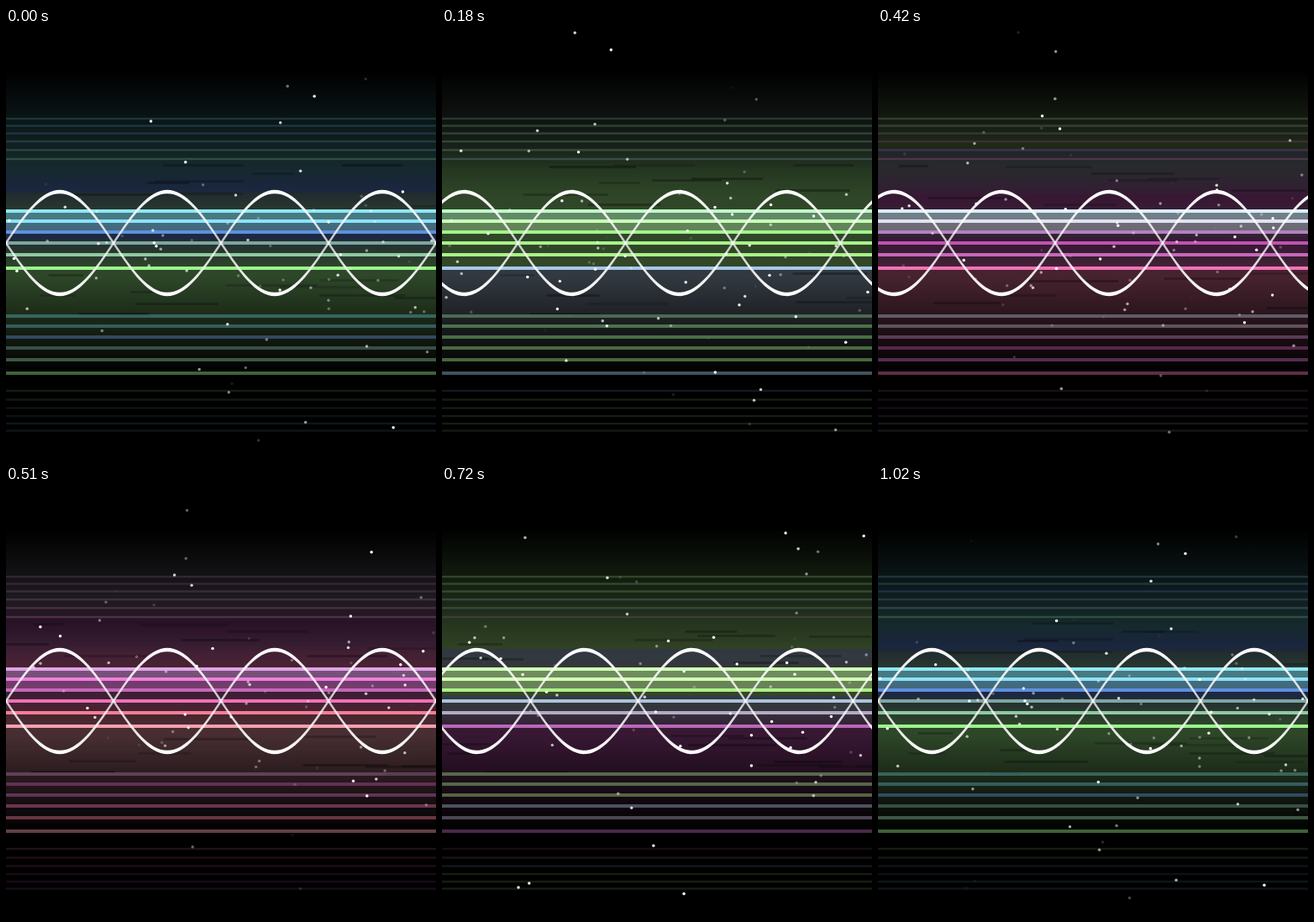
An HTML page that plays this animation: 512x512 px, repeating every 1050 ms.

```html
<!DOCTYPE html>
<html lang="en">
<head>
<meta charset="utf-8">
<title>Standing waves</title>
<style>
html, body { margin: 0; width: 100%; height: 100%; overflow: hidden; background: #000; }
svg { display: block; width: 100%; height: 100%; }
</style>
</head>
<body>
<svg viewBox="0 0 512 512">
  <defs>
    <linearGradient id="shine" gradientUnits="userSpaceOnUse" x1="0" y1="193" x2="0" y2="319">
      <stop offset="0" stop-color="#fff"/>
      <stop offset=".5" stop-color="#fff" stop-opacity=".72"/>
      <stop offset="1" stop-color="#fff"/>
    </linearGradient>
  </defs>
  <rect width="512" height="512"/>
  <g id="sky" shape-rendering="crispEdges"></g>
  <g id="streaks"></g>
  <g id="lines"></g>
  <g id="waves" fill="url(#shine)"></g>
  <g id="stars" fill="#fff"></g>
</svg>
<script>
const STEP = 30, FRAMES = 35, HALF = 17;
const byId = id => document.getElementById(id);

function add(parent, tag, attrs = {}) {
  const el = document.createElementNS('http://www.w3.org/2000/svg', tag);
  for (const name in attrs) el.setAttribute(name, attrs[name]);
  return byId(parent).appendChild(el);
}

let seed = 7;
function random() {
  seed = (seed * 16807) % 2147483647;
  return seed / 2147483647;
}
const between = (a, b) => a + (b - a) * random();
const clamp = (v, low, high) => Math.max(low, Math.min(high, v));
const css = c => `rgb(${c.map(v => Math.round(clamp(v, 0, 255)))})`;

// One colour ramp, position:colour, slides through both sky and lines
const ramp = ('0:62bcc8 1:62b4d0 1.9:5f8fdf 2.5:5f8fdf 2.55:7698a4 4:8fc9a0 5.2:9cf48c ' +
  '9.42:b0f088 9.45:a8c8e8 10.7:b4bcc8 11.7:b088c0 12.7:c050b0 13.9:c468b8 14.9:f070b8 16:f87c98 17.3:f8a0b0')
  .split(' ').map(stop => {
    const [at, hex] = stop.split(':');
    return { at: +at, rgb: [0, 2, 4].map(i => parseInt(hex.substr(i, 2), 16)) };
  });
function rampColour(u) {
  const pos = clamp(u, 0, ramp[ramp.length - 1].at);
  const next = Math.max(1, ramp.findIndex(stop => stop.at >= pos));
  const a = ramp[next - 1], b = ramp[next];
  const k = (pos - a.at) / (b.at - a.at);
  return a.rgb.map((v, i) => v + (b.rgb[i] - v) * k);
}

// Place of a height on the ramp: the sky above the bright lines repeats it
const depth = y => y < 216 ? clamp((y - 150) / 18, -1, 4) : clamp((y - 218) / 13, 0, 5.7);

const strips = [];
for (let y = 50; y < 410; y += 2) {
  strips.push({
    depth: depth(y),
    light: .29 * Math.min(clamp((y - 50) / 150, 0, 1), clamp((410 - y) / 115, 0, 1)),
    el: add('sky', 'rect', { y, width: 512, height: 2 })
  });
}

const lines = [];
function bar(y, height, row, opacity, glow = 0) {
  const el = add('lines', 'rect', { y, width: 512, height, opacity });
  lines.push({ depth: depth(rows[row]), glow, el });
}
const rows = [218, 230, 243, 256, 270, 286];
bar(218, 12, 0, .38, 44);
bar(230, 13, 1, .33, 44);
rows.forEach((y, i) => {
  const upper = 108 + 8.2 * i + .28 * i * i;
  const lower = 479.5 - 8.2 * i - .26 * i * i;
  bar(upper - 1.2, 2.4, i, .2);
  bar(y - 2, 4, i, 1, i < 2 ? 44 : 0);
  bar(y + 123, 4, i, .4);
  bar(lower - 1.2, 2.4, i, .12);
});

// Waves keep a constant vertical thickness
const waves = [1, -1].map(sign => ({ sign, el: add('waves', 'path') }));
function wavePath(sign, shift) {
  const upper = [], lower = [];
  for (let x = -4; x <= 516; x += 4) {
    const y = 256 + sign * 61 * Math.sin((x - shift) * Math.PI / 128);
    upper.push(`${x} ${(y - 2.2).toFixed(2)}`);
    lower.unshift(`${x} ${(y + 2.2).toFixed(2)}`);
  }
  return `M${upper.concat(lower).join('L')}Z`;
}

// Stars crowd around the middle, a few stray over the whole height
const stars = [];
for (let i = 0; i < 190; i++) {
  const crowded = 257 + (random() + random() + random() - 1.5) * 150;
  stars.push({
    x: between(-8, 510), y: i % 5 ? crowded : between(4, 495),
    vx: between(1.1, 1.8), vy: between(-.6, .7),
    birth: Math.floor(between(0, FRAMES)), life: between(11, 17),
    el: add('stars', 'circle', { r: 1.75 })
  });
}

const streaks = [];
for (let i = 0; i < 50; i++) {
  const y = i % 2 ? between(160, 212) : between(290, 350);
  streaks.push({
    x: between(-40, 470), birth: Math.floor(between(0, FRAMES)), life: between(9, 15),
    el: add('streaks', 'rect', { y: Math.round(y), width: between(35, 110), height: 3 })
  });
}
const ageOf = (item, frame) => (frame - item.birth + FRAMES) % FRAMES;

function draw(frame) {
  const slide = 12 * (1 - Math.abs(frame - HALF) / HALF);
  for (const s of strips)
    s.el.setAttribute('fill', css(rampColour(s.depth + slide).map(v => v * s.light)));
  for (const l of lines)
    l.el.setAttribute('fill', css(rampColour(l.depth + slide).map(v => v + l.glow)));

  for (const w of waves) w.el.setAttribute('d', wavePath(w.sign, frame * 256 / HALF));

  for (const s of stars) {
    const age = ageOf(s, frame);
    s.el.setAttribute('cx', s.x + s.vx * age);
    s.el.setAttribute('cy', s.y + s.vy * age);
    s.el.setAttribute('opacity', clamp(1.1 * (1 - age / s.life), 0, 1));
  }
  for (const s of streaks) {
    const age = ageOf(s, frame);
    s.el.setAttribute('x', s.x + 3 * age);
    s.el.setAttribute('opacity', age < s.life ? .3 * (1 - .5 * age / s.life) : 0);
  }
}

const start = performance.now();
function tick(now) {
  draw(Math.floor(Math.max(0, now - start) / STEP) % FRAMES);
  requestAnimationFrame(tick);
}
draw(0);
requestAnimationFrame(tick);
</script>
</body>
</html>
```
